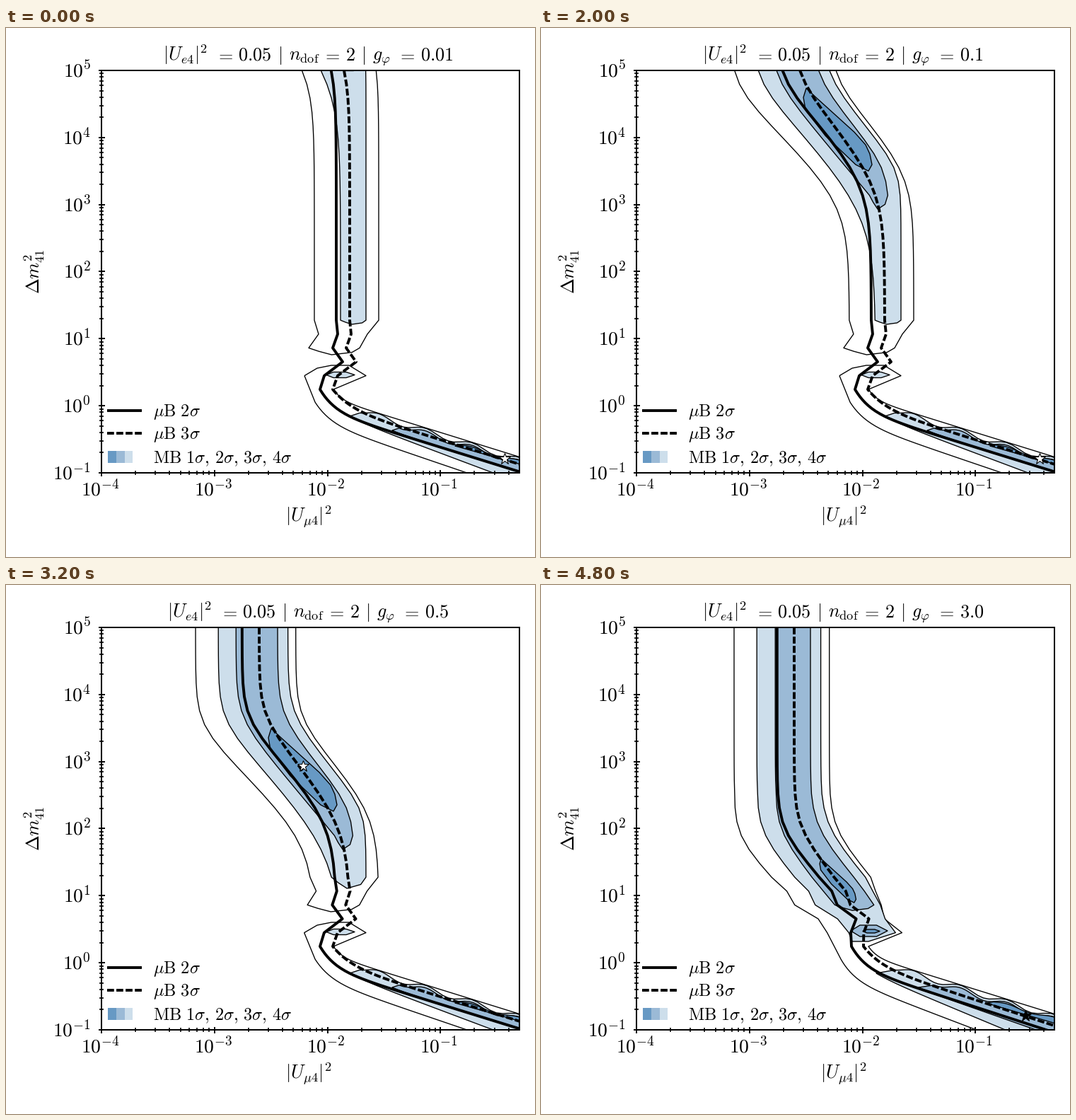
Write a matplotlib script that moves like this. It is 748 px wide and 748 px high and loops after 5000 ms.

```python
import numpy as np
import matplotlib.pyplot as plt
from matplotlib.animation import FuncAnimation
from matplotlib.patches import Polygon, Rectangle

plt.rcParams["mathtext.fontset"] = "cm"

SIZE, DPI, FRAMES = 748, 100, 25
PX = 72 / DPI                      # points per pixel
LEFT, RIGHT, TOP, BOTTOM = 135, 726, 60, 629
X_DECADE = (RIGHT - LEFT) / np.log10(5e3)
Y_DECADE = (BOTTOM - TOP) / 6
STEP = (BOTTOM - TOP) / 29         # mass grid spacing; the bend drops one node per frame
NODE = np.arange(23)               # grid rows from the top down to the neck
DARK, MID, LIGHT = "#6799c4", "#9bbad6", "#cddeeb"
DASH = (0, (2.5, 0.85))

fig = plt.figure(figsize=(SIZE / DPI, SIZE / DPI), dpi=DPI, facecolor="white")
ax = fig.add_axes([LEFT / SIZE, 1 - BOTTOM / SIZE,
                   (RIGHT - LEFT) / SIZE, (BOTTOM - TOP) / SIZE])
ax.set(xlim=(LEFT, RIGHT), ylim=(BOTTOM, TOP), autoscale_on=False)


def label(x, y, tex, em=26.2, ha="left", **kw):
    return ax.text(x, y, f"${tex}$", fontsize=em * PX, ha=ha,
                   **{"va": "baseline", **kw})


def setup_axes():
    x_major = [LEFT + X_DECADE * n for n in range(4)]
    y_major = [BOTTOM - Y_DECADE * n for n in range(7)]
    logs = np.log10(np.arange(2, 10))
    x_minor = [x + X_DECADE * v for x in x_major for v in logs]
    y_minor = [y - Y_DECADE * v for y in y_major[:-1] for v in logs]
    ax.set_xticks(x_major)
    ax.set_yticks(y_major)
    ax.set_xticks([x for x in x_minor if x < RIGHT], minor=True)
    ax.set_yticks(y_minor, minor=True)
    ax.tick_params(which="both", direction="inout", labelleft=False, labelbottom=False)
    ax.tick_params(which="major", length=9 * PX, width=1.9 * PX)
    ax.tick_params(which="minor", length=6 * PX, width=1.6 * PX)
    for spine in ax.spines.values():
        spine.set_linewidth(2 * PX)
    for n, x in enumerate(x_major):
        label(x - 2, 661, f"10^{{{n - 4}}}", 27.5, "center")
    for n, y in enumerate(y_major):
        label(120, y + 9, f"10^{{{n - 1}}}", 27.5, "right")
    label(428, 699, r"|U_{\mu 4}|^2", ha="center")
    label(40, 344.5, r"\Delta m^2_{41}", ha="center", va="center", rotation=90)


def setup_legend():
    for n, style in enumerate(("-", DASH)):
        y = 541 + 32.5 * n
        ax.plot([143, 192], [y, y], color="k", ls=style, lw=3.9 * PX,
                dash_capstyle="butt", solid_capstyle="butt")
        label(208, y + 8, rf"\mu\mathrm{{B}}\ {n + 2}\sigma", 24.3)
    for n, color in enumerate((DARK, MID, LIGHT)):
        ax.add_patch(Rectangle((144 + 11.8 * n, 598), 11.8, 17, fc=color, ec="none"))
    sigmas = r",\,".join(rf"{n}\sigma" for n in range(1, 5))
    label(208, 615, rf"\mathrm{{MB}}\ {sigmas}", 24.3)


setup_axes()
setup_legend()

TITLE = [(222, "|U_{e4}|^2", "left"), (308.5, "=", "center"), (328.5, "0.05", "left"),
         (387, "|", "center"), (400, r"n_{\mathrm{dof}}", "left"), (460, "=", "center"),
         (480, "2", "left"), (505, "|", "center"), (518, r"g_\varphi", "left"),
         (566, "=", "center"), (585.5, "0", "left")]
title = [label(x, 46, tex, ha=ha) for x, tex, ha in TITLE]


def late(k):
    """Progress of the final stage, when the bend reaches the neck."""
    return max(0, (k - 16) / 8)


def softplus(v, width):
    return width * np.logaddexp(0, v / width)


def edge(k, column, slope, start, end, soft, neck=(0, 0, 0, 0), shrink=0.5, drift=0):
    """Vertical line with a smooth slanted ramp that travels down, and a zigzag neck."""
    j = NODE - k
    ramp = softplus(end - j, soft) - softplus(start - j, 1)
    x = column - slope * ramp * np.where(NODE < 22, 1, 0.6)
    x[19:] += np.array(neck) * (1 - shrink * late(k))
    x += drift * late(k) ** 3 * np.clip((-6 - j) / 6, 0, 1)
    return list(zip(x, TOP + STEP * NODE))


def tail(k, x0, y0, slope, hook=0, reach=20, slide=0, ripple=None):
    """Slanted lower branch: a short hook that settles into a straight line."""
    u = np.linspace(0, 1, 40) ** 1.5 * (760 - x0)
    y = y0 + slope * u + hook * (1 - np.exp(-u / reach))
    if ripple:
        y += ripple * np.cos(2 * np.pi * (x0 + u - 560) / 66)
    x = x0 + u - slide * late(k) ** 3 * (1 + u / 120)
    return list(zip(x, y))


NECK_LINE = (2, -5, 9, -17)
NECK_LEFT = (6, -8, 24, -14)
NECK_RIGHT = np.array((-16, -27, -41, -18))

LINES = [(dict(column=467, slope=18, start=-9.4, end=-2, soft=1.6, neck=NECK_LINE, shrink=0),
          dict(x0=444, y0=511, slope=0.31, hook=29, reach=21, slide=5), "-"),
         (dict(column=486, slope=16, start=-9.6, end=-1.6, soft=1.6, neck=NECK_LINE, shrink=0),
          dict(x0=462, y0=511, slope=0.31, hook=24, reach=26, slide=6), DASH)]

OUTER_LEFT = dict(column=436, slope=20, start=-8.9, end=-0.5, soft=1.6, neck=NECK_LEFT, drift=5)
OUTER_RIGHT = dict(column=527, slope=17, start=-9.4, end=-2.5, soft=1.4, neck=NECK_RIGHT, drift=-2)
LIGHT_LEFT = dict(column=473, slope=18, start=-9.3, end=0.3, soft=2, neck=NECK_LEFT, drift=5)
LIGHT_RIGHT = dict(column=509, slope=16, start=-9.75, end=-2.85, soft=0.8,
                   neck=NECK_RIGHT * 0.6, drift=-3)
MID_LEFT = dict(column=481, slope=16.4, start=-9.5, end=0, soft=0.3, drift=6)
MID_RIGHT = dict(column=492, slope=16, start=-9.65, end=-2.9, soft=0.9, drift=-3)

# 1-sigma island around its own centre
ISLAND = np.array([(43, 59), (48, 50), (45, 35), (39, 22), (23, 4), (-30, -44), (-45, -58),
                   (-49, -45), (-46, -28), (-18, 9), (25, 50)])


def above(left, right):
    """Extra corners that leave the outline open at the top of the axes."""
    return [(right[0][0], 40), (left[0][0], 40)]


def column(left, right, y_end):
    """Outline between two edges, rounded off at y_end."""
    n = int((y_end - 3 - TOP) / STEP) + 1
    left, right = left[:n], right[:n]
    (xl, y), (xr, _) = left[-1], right[-1]
    w, h = xr - xl, y_end - y
    cap = [(xl + 0.2 * w, y + 0.5 * h), (xl + 0.45 * w, y_end), (xl + 0.85 * w, y + 0.65 * h)]
    return left + cap + right[::-1] + above(left, right)


def lozenge(x, y, w, h):
    return [(x - w, y), (x - w / 2, y - h), (x + 0.4 * w, y - h),
            (x + w, y), (x + 0.4 * w, y + h), (x - w / 2, y + h)]


def outer_regions(k):
    left, right = edge(k, **OUTER_LEFT), edge(k, **OUTER_RIGHT)
    low = tail(k, 437, 529, 0.34, 27, 22, 13)
    high = tail(k, 463, 511, 0.31, 14, 12)
    if k >= 20:
        return [left + low + high[::-1] + right[::-1] + above(left, right)]
    lower = left[22:] + low + high[::-1] + right[22:] + [(485, 477), (460, 477), (440, 481)]
    return [column(left, right, 462), lower]


def light_regions(k):
    left, right = edge(k, **LIGHT_LEFT), edge(k, **LIGHT_RIGHT)
    branch = (tail(k, 486, 549, 0.375, 4, 25, 12)
              + tail(k, 500, 541, 0.31, ripple=4)[::-1])
    if k >= 23:
        neck = [(440, 504), (463, 504)]
        return [left + neck + right[::-1] + above(left, right), branch]
    y_end = np.interp(k, [14, 16, 20, 23], [419, 429, 456, 463])
    grow = min(1, late(k) * 1.6)
    spot = lozenge(473 - 3 * grow, 490.5, 20 + 10 * grow, 4 + 3 * grow)
    return [column(left, right, y_end), spot, branch]


def mid_regions(k):
    y_end = min(TOP + STEP * k, 414 + 7.7 * (k - 18))
    regions = [tail(k, 546, 569, 0.315, 2, 20, 12) + tail(k, 556, 562, 0.31, ripple=4)[::-1],
               column(edge(k, **MID_LEFT), edge(k, **MID_RIGHT), y_end)]
    return regions + [lozenge(464, 489, 26, 8)] if k >= 23 else regions


def dark_regions(k):
    island = ISLAND * (1 - 0.47 * late(k) ** 3) + [420, STEP * k - 53]
    regions = [island, tail(k, 635, 591, 0.28, slide=6) + tail(k, 640, 589, 0.28, ripple=2)[::-1]]
    return regions + [lozenge(467, 489.5, 12, 2.5)] if k >= 23 else regions


def star_at(k):
    if k < 12:
        return 705, 609
    if k < 19:
        return 420, STEP * k - 57.5
    return 685, 609


moving = []


def draw(k):
    while moving:
        moving.pop().remove()
    for color, regions in (("none", outer_regions), (LIGHT, light_regions),
                           (MID, mid_regions), (DARK, dark_regions)):
        for outline in regions(k):
            moving.append(ax.add_patch(Polygon(outline, closed=True, fc=color, ec="k",
                                               lw=1.35 * PX, joinstyle="round")))
    for upper, lower, style in LINES:
        xs, ys = zip(*edge(k, **upper), *tail(k, **lower))
        moving.extend(ax.plot(xs, ys, color="k", ls=style, lw=3.9 * PX, dash_capstyle="butt"))
    moving.extend(ax.plot(*star_at(k), "*", ms=17 * PX, mfc="k" if k >= 23 else "w",
                          mec="k", mew=1.1 * PX, zorder=4))

    coupling = str(float(f"{0.01 * 10 ** (3 * k / 29):.1g}"))
    title[-1].set_text(f"${coupling}$")
    offset = 0 if len(coupling) == 4 else 6
    for text, (x, _, _) in zip(title, TITLE):
        text.set_x(x + offset)
    return moving + title


anim = FuncAnimation(fig, draw, frames=FRAMES, interval=200, init_func=lambda: draw(0),
                     repeat=True, repeat_delay=0, blit=False)
plt.show()
```
